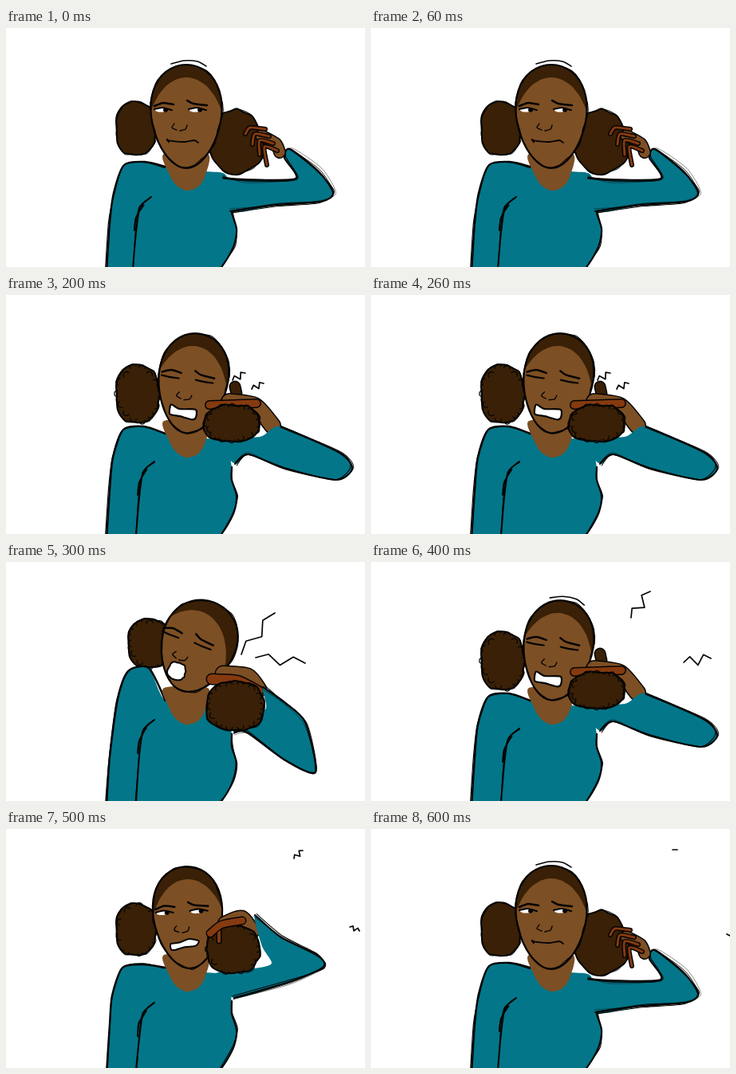
Write an HTML page with a canvas that moves like this. It is 450 px wide and 300 px high and loops after 700 ms.

```html
<!DOCTYPE html>
<html lang="en">
<head>
<meta charset="utf-8">
<title>Hair trouble</title>
<style>
  html, body { margin: 0; width: 100%; height: 100%; overflow: hidden; background: #fff; }
  canvas { display: block; }
</style>
</head>
<body>
<canvas id="stage" width="450" height="300"></canvas>
<script>
const ctx = document.getElementById('stage').getContext('2d');
const STEP = 100;
const TEAL = '#047689', SKIN = '#7d4f24', HAIR = '#392006', HAND = '#853a0f',
      WHITE = '#fff', INK = '#050404';

const points = text => text.split(' ').map(p => p.split(',').map(Number));

// Repeatable randomness from -1 to 1, reseeded for every drawing
let seed = 1;
function rough() {
  seed = seed * 16807 % 2147483647;
  return seed / 1073741823.5 - 1;
}
const shake = (pts, by) => pts.map(([x, y]) => [x + rough() * by, y + rough() * by]);

// Points around an oval; narrow > 0 tapers the lower end, square > 0 fills the corners
function oval(cx, cy, rx, ry, { narrow = 0, square = 0, turn = 0 } = {}) {
  return Array.from({ length: 24 }, (_, i) => {
    const t = i * Math.PI / 12, u = -Math.cos(t);
    const k = 1 + square * Math.sin(2 * t) ** 2;
    const x = rx * k * Math.sin(t) * (1 - narrow * u), y = ry * k * u;
    return [cx + x * Math.cos(turn) - y * Math.sin(turn),
            cy + x * Math.sin(turn) + y * Math.cos(turn)];
  });
}

function trace(pts, closed = false) {
  const n = pts.length;
  const at = i => closed ? pts[(i + n) % n] : pts[Math.max(0, Math.min(n - 1, i))];
  ctx.beginPath();
  ctx.moveTo(...pts[0]);
  for (let i = 0; i < (closed ? n : n - 1); i++) {
    const [a, b, c, d] = [at(i - 1), at(i), at(i + 1), at(i + 2)];
    ctx.bezierCurveTo(b[0] + (c[0] - a[0]) / 8, b[1] + (c[1] - a[1]) / 8,
                      c[0] - (d[0] - b[0]) / 8, c[1] - (d[1] - b[1]) / 8, ...c);
  }
}

function stroke(width, color = INK) {
  ctx.lineWidth = width;
  ctx.strokeStyle = color;
  ctx.stroke();
}

function fill(pts, color, width = 0) {
  trace(pts, true);
  ctx.fillStyle = color;
  ctx.fill();
  if (width) stroke(width);
}

function line(text, width) {
  trace(points(text));
  stroke(width);
}

// A pen line gone over again more loosely
function sketch(pts, width, loose = 1.6, closed = false) {
  trace(pts, closed);
  stroke(width);
  trace(shake(pts, loose), closed);
  stroke(width * 0.5);
}

// A rounded strip with an ink edge, for fingers and palms
function tube([text, width, color]) {
  trace(points(text));
  stroke(width + 3);
  stroke(width, color);
}

function bun({ at: [cx, cy], size: [rx, ry], turn = 0, curls = 0 }) {
  const rim = shake(oval(cx, cy, rx, ry, { square: 0.07, turn }), 1.2);
  fill(rim, HAIR);
  sketch(rim, 1.9, 1.6, true);
  for (let i = 0; i < curls; i++) {
    const a = i * 2 * Math.PI / curls, k = 0.9 + rough() * 0.07;
    ctx.beginPath();
    ctx.arc(cx + rx * k * Math.cos(a), cy + ry * k * Math.sin(a), 4, a - 1.6, a + 1.4);
    stroke(1.2);
  }
}

function torso([sx, sy], [ax, ay]) {
  const left = [[200, 174], [sx + 26, sy - 4], [sx, sy], [sx - 13, sy + 35], [130, 245], [126, 306]];
  const right = points('283,216 283,232 289,252 286,272 277,290 266,306');
  fill([...left, [126, 330], [262, 330], ...right.reverse(), [275, 184], [250, 180]], TEAL);
  sketch(left, 2.4);
  sketch(right, 2.2);
  sketch([[ax, ay], [ax - 14, ay + 13], [ax - 19, ay + 45], [ax - 23, 302]], 2);
  sketch([[ax - 10, ay + 10], [ax - 19, ay + 26], [ax - 21, ay + 42]], 1.8);
  fill(points('198,158 204,182 213,197 226,204 240,200 249,187 253,158'), SKIN);
}

function arm(inner, outer) {
  const edge = points(outer);
  fill([...points(inner), ...edge], TEAL);
  sketch(edge, 2.1, 2.4);
  sketch(shake(edge, 2), 0.9, 3);
}

const mouths = {
  frown() {
    line('-24,30 -17,31 -2,32 10,30 15,33', 1.8);
    line('-24,29 -22,32', 2.2);
  },
  grimace() { fill(points('-23,31 -12,30 0,26 12,29 8,35 -6,36 -18,39 -23,38'), WHITE, 2); },
  teeth() { fill(points('-23,26 -12,30 8,28 10,37 6,41 -10,39 -23,38'), WHITE, 2.2); },
  scream() { fill(shake(oval(-6, 32, 11, 11, { square: 0.1 }), 0.8), WHITE, 2); }
};

function eye(x, open) {
  if (open) {
    fill(oval(x - 3, -8, 7, 2.5), WHITE);
    fill(oval(x + 3, -8, 3, 2.5), INK);
  }
  line(`${x - 11},-9 ${x - 1},${open ? -11 : -8} ${x + 11},-8`, 2.1);
}

function head({ at, size: [rx, ry], tilt = 0, look: [dx, dy], mouth, open, cap }) {
  const skull = oval(0, 0, rx, ry, { narrow: 0.17 });
  ctx.save();
  ctx.translate(...at);
  ctx.rotate(tilt);
  fill(skull, HAIR);
  ctx.save();
  trace(skull, true);
  ctx.clip();
  fill(oval(dx / 2 - tilt * 15, 30, rx + 6, ry + 14), SKIN);
  ctx.restore();
  sketch(skull, 2.2, 1.6, true);
  if (cap) line(`-19,${-ry - 1} -3,${-ry - 5} 14,${-ry - 4} 25,${2 - ry}`, 1.6);
  ctx.translate(dx, dy);
  line('-40,-13 -29,-17 -16,-15', 2.5);
  line('1,-20 9,-16 26,-14', 2.5);
  eye(-29, open);
  eye(14, open);
  line('-15,9 -18,14 -12,17', 1.4);
  line('-8,18 -1,16 1,11', 1.4);
  mouths[mouth]();
  ctx.restore();
}

const calm = {
  shoulder: [148, 172], sleeve: [182, 212],
  head: { at: [226, 111], size: [44, 65], look: [0, 0], mouth: 'frown', open: true, cap: true },
  left: { at: [163, 126], size: [25, 33] },
  right: { at: [287, 143], size: [34, 40], turn: -0.4 }, behind: true,
  arm: ['262,184', '272,188 300,190 363,189 349,163 356,152 392,180 410,207 395,218 340,222 282,230'],
  fingers: [['320,135 338,145 343,156', 13, SKIN],
    ...[0, 1, 2, 3].map(i => [`${325 + i * 5},${127 + i * 9} ${306 + i * 6},${125 + i * 8} ${300 + i * 9},${133 + i * 13}`, 3, HAND])]
};

const wince = {
  shoulder: [146, 174], sleeve: [186, 218],
  head: { at: [228, 111], size: [43, 64], tilt: -0.05, look: [0, 1], mouth: 'grimace', open: true },
  left: { at: [163, 126], size: [25, 32], curls: 9 },
  right: { at: [285, 151], size: [33, 30], curls: 10 },
  arm: ['262,182 318,174 333,168 321,147', '312,108 345,136 390,158 398,173 358,191 286,212'],
  hand: [['275,119 295,112 308,128', 18, SKIN]],
  fingers: [['267,125 267,141', 4, HAND], ['256,131 270,120 296,115', 8, HAND]]
};

const pain = {
  shoulder: [147, 169], sleeve: [186, 209],
  head: { at: [234, 111], size: [43, 63], tilt: 0.14, look: [0, 4], mouth: 'teeth' },
  left: { at: [165, 124], size: [27, 36], curls: 14 },
  right: { at: [283, 161], size: [35, 23], curls: 16 },
  arm: ['262,182 318,178', '345,165 418,198 434,218 414,232 350,218 304,200 287,212'],
  hand: [['287,115 289,124', 12, HAIR], ['280,134 312,139 334,164', 19, SKIN], ['255,138 285,137 314,136', 9, HAND]]
};

const scream = {
  shoulder: [153, 137], sleeve: [186, 198],
  head: { at: [240, 106], size: [46, 59], tilt: 0.35, look: [-8, 6], mouth: 'scream' },
  left: { at: [180, 102], size: [27, 30], curls: 12 },
  right: { at: [287, 181], size: [36, 31], curls: 14 },
  arm: ['282,188 325,185', '322,157 350,177 375,201 388,264 350,249 302,214 286,214'],
  hand: [['272,140 303,143 317,160', 18, SKIN], ['258,147 290,149 316,162', 12, HAND]]
};

function draw(pose, cap) {
  seed = 77;
  bun(pose.left);
  if (pose.behind) bun(pose.right);
  torso(pose.shoulder, pose.sleeve);
  head({ ...pose.head, cap: pose.head.cap || cap });
  (pose.hand || []).forEach(tube);
  arm(...pose.arm);
  if (!pose.behind) bun(pose.right);
  (pose.fingers || []).forEach(tube);
}

// A zigzag between two ends
function spark(x0, y0, x1, y1) {
  const dx = x1 - x0, dy = y1 - y0, len = Math.hypot(dx, dy);
  const bends = len < 9 ? 1 : 4, swing = Math.min(6, len * 0.2) / len;
  ctx.beginPath();
  for (let i = 0; i <= bends; i++) {
    const k = i / bends, side = i % bends ? (i % 2 ? -swing : swing) : 0;
    ctx.lineTo(x0 + dx * k - dy * side, y0 + dy * k + dx * side);
  }
  stroke(1.7);
}

// Each step: pose, rising spark, sideways spark, loose line over the head
const steps = [
  [calm],
  [wince, [278, 93, 281, 85], [290, 97, 297, 98]],
  [pain, [284, 107, 300, 98], [308, 118, 323, 111]],
  [scream, [295, 116, 337, 64], [313, 120, 375, 127]],
  [pain, [326, 70, 350, 37], [392, 126, 426, 121], true],
  [wince, [361, 37, 372, 27], [431, 123, 443, 128]],
  [calm, [378, 26, 384, 26], [446, 132, 450, 134]]
];

ctx.lineCap = ctx.lineJoin = 'round';
const start = performance.now();
let shown = -1;

function play() {
  const now = Math.floor(Math.max(0, performance.now() - start) / STEP) % steps.length;
  if (now !== shown) {
    const [pose, rising, sideways, cap] = steps[now];
    ctx.fillStyle = WHITE;
    ctx.fillRect(0, 0, 450, 300);
    draw(pose, cap);
    if (rising) {
      spark(...rising);
      spark(...sideways);
    }
    shown = now;
  }
  requestAnimationFrame(play);
}
play();
</script>
</body>
</html>
```
